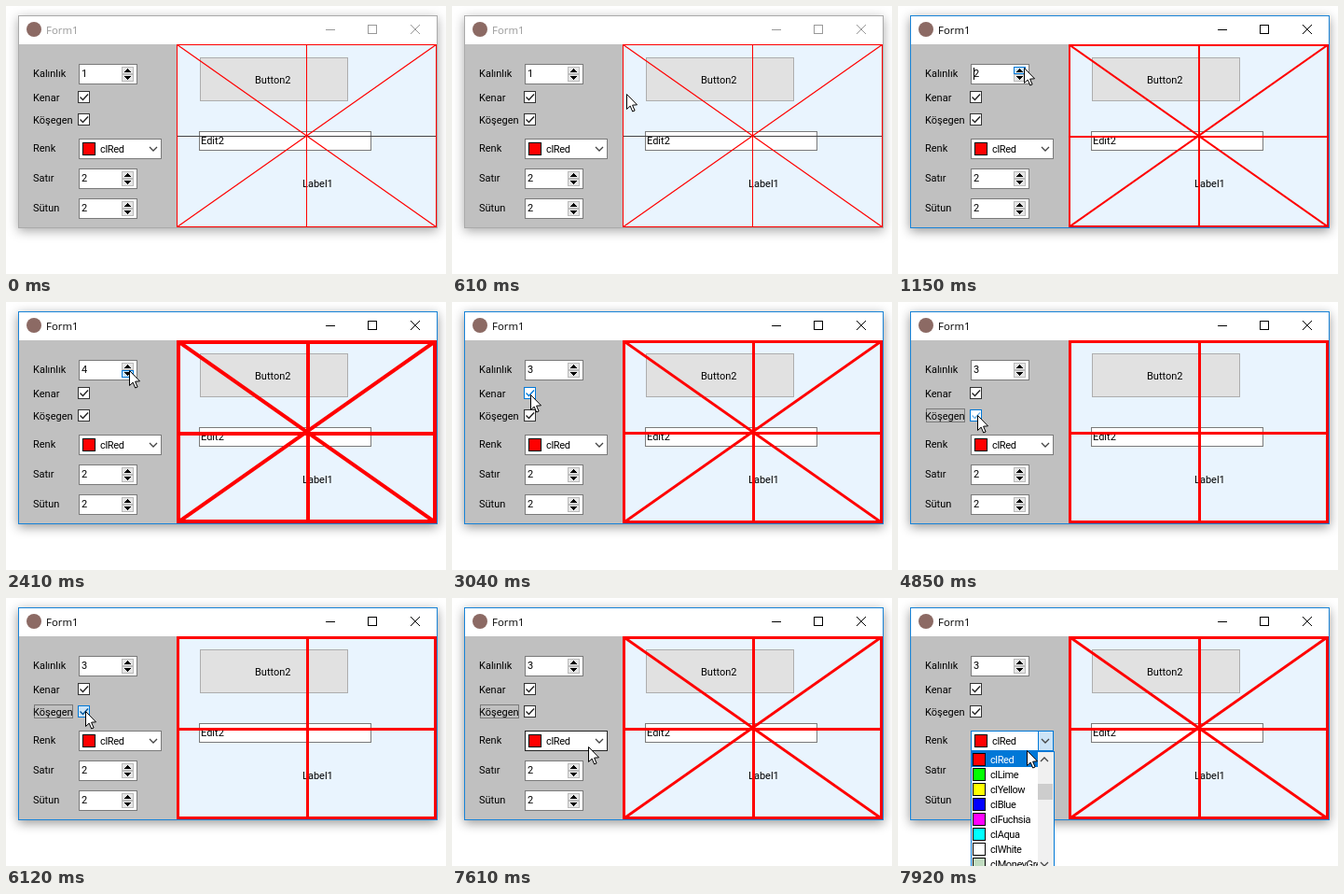
Write an HTML page with a canvas that moves like this. It is 472 px wide and 287 px high and loops after 8000 ms.

```html
<!DOCTYPE html>
<html lang="tr">
<head>
<meta charset="utf-8">
<style>
html, body { margin: 0; width: 100%; height: 100%; overflow: hidden; background: #fff; }
canvas { display: block; }
</style>
</head>
<body>
<canvas id="stage" width="472" height="287"></canvas>
<script>
const c = document.getElementById('stage').getContext('2d');
const LOOP = 8000, RED = '#f00', BLUE = '#0078d7', PALE = '#cce4f7', GRAY = '#7a7a7a';
const UI = '11px Roboto, sans-serif';
const COLORS = [['clRed', RED], ['clLime', '#0f0'], ['clYellow', '#ff0'], ['clBlue', '#00f'],
  ['clFuchsia', '#f0f'], ['clAqua', '#0ff'], ['clWhite', '#fff'], ['clMoneyGreen', '#c0dcc0']];

// Pointer path: time, x, y
const PATH = [[70, 380, 198], [840, 135, 66], [2020, 135, 66], [2180, 132, 73], [2570, 132, 73],
  [3040, 84, 99], [4070, 84, 99], [4690, 85, 121], [7060, 85, 121], [7610, 146, 159],
  [7760, 155, 156], [7840, 150, 158], [7920, 138, 163]];
const EDGE_CLICKS = [3200, 3820];
const DIAGONAL_CLICKS = [4770, 5480, 6120, 6830];

const within = (t, from, to) => t >= from && t < to;
const count = (t, times) => times.filter(x => t >= x).length;

function fill(x, y, w, h, color) {
  c.fillStyle = color;
  c.fillRect(x, y, w, h);
}

function box(x, y, w, h, color, border) {
  fill(x, y, w, h, border);
  fill(x + 1, y + 1, w - 2, h - 2, color);
}

function text(s, x, y, color = '#000', font = UI, spacing = 0) {
  c.font = font;
  c.letterSpacing = spacing + 'px';
  c.fillStyle = color;
  c.fillText(s, x, y);
}

function line(points, color, width = 1) {
  c.beginPath();
  points.forEach(([x, y]) => c.lineTo(x, y));
  c.strokeStyle = color;
  c.lineWidth = width;
  c.stroke();
}

function chevron(x, y, dir) {
  line([[x - 4, y - 2 * dir], [x, y + 2 * dir], [x + 4, y - 2 * dir]], '#444', 1.3);
}

function drawWindow(active) {
  const ink = active ? '#000' : '#999';
  c.save();
  c.shadowColor = active ? 'rgba(0,0,0,.42)' : 'rgba(0,0,0,.34)';
  c.shadowBlur = 11;
  c.shadowOffsetY = 3;
  fill(13, 10, 450, 228, '#fff');
  c.restore();
  box(13, 10, 450, 228, '#fff', active ? '#1883d7' : '#aaa');
  c.fillStyle = '#8c6a64';
  c.beginPath();
  c.arc(30, 25, 8, 0, 7);
  c.fill();
  text('Form1', 43, 30, ink, '11.4px "Open Sans", sans-serif');
  fill(343, 25, 10, 1, ink);
  box(388, 20, 10, 10, '#fff', ink);
  line([[434, 20], [444, 30]], ink);
  line([[444, 20], [434, 30]], ink);
  fill(14, 41, 169, 196, '#c0c0c0');
  fill(183, 41, 279, 196, '#e9f4fe');
}

function spinner(y, value, hot = 0) {
  box(78, y, 63, 22, '#fff', GRAY);
  text(value, 81, y + 14);
  for (const dir of [1, -1]) {
    const top = dir > 0 ? y + 3 : y + 11, tip = dir > 0 ? top + 2 : top + 6;
    const on = hot === dir;
    box(124, top, 13, 8, on ? PALE : '#e6e6e6', on ? BLUE : '#bbb');
    for (let i = 0; i < 4; i++) fill(130 - i, tip + i * dir - (dir < 0 ? 1 : 0), 2 * i + 1, 1, '#000');
  }
}

// The tick fades shortly after every click.
function checkbox(t, y, clicks, hot) {
  const n = count(t, clicks), checked = n % 2 === 0;
  const fade = n ? Math.min(1, Math.max(0, (t - clicks[n - 1] - 20) / 140)) : 1;
  const pressed = n > 0 && t - clicks[n - 1] < 80;
  box(77, y, 13, 13, pressed ? PALE : '#fff', hot ? BLUE : '#333');
  c.globalAlpha = checked ? fade : 1 - fade;
  line([[79.5, y + 6.5], [82.5, y + 9.5], [88, y + 3.5]], pressed ? '#005499' : hot ? BLUE : '#222', 1.4);
  c.globalAlpha = 1;
}

function focusRect(x, y, w, h) {
  c.setLineDash([1, 1]);
  c.strokeStyle = '#333';
  c.lineWidth = 1;
  c.strokeRect(x + .5, y + .5, w - 1, h - 1);
  c.setLineDash([]);
}

function swatch(x, y, color) {
  box(x, y, 14, 14, color, '#000');
}

function combo(hot, open) {
  box(78, 142, 89, 22, '#fff', open ? BLUE : hot ? '#222' : GRAY);
  if (open) box(150, 142, 17, 22, PALE, BLUE);
  swatch(82, 146, RED);
  text('clRed', 101, 157, '#000', UI, -.35);
  chevron(158, 153, 1);
}

function dropdown() {
  box(78, 164, 90, 130, '#fff', BLUE);
  c.save();
  c.beginPath();
  c.rect(79, 165, 71, 122);
  c.clip();
  fill(79, 165, 71, 16, BLUE);
  COLORS.forEach(([name, color], i) => {
    swatch(80, 166 + 16 * i, color);
    text(name, 99, 177 + 16 * i, i ? '#000' : '#fff', UI, -.4);
  });
  c.restore();
  fill(150, 165, 17, 122, '#f0f0f0');
  fill(150, 199, 16, 17, '#cdcdcd');
  chevron(157, 173, -1);
  chevron(157, 285, 1);
}

function drawPanel(w, edge, diagonal) {
  const L = 183, T = 41, R = 462, B = 237;
  box(208, 55, 159, 47, '#e1e1e1', '#adadad');
  text('Button2', 267, 83);
  box(207, 134, 185, 21, '#fff', GRAY);
  text('Edit2', 209, 148);
  text('Label1', 318, 194);
  c.save();
  c.beginPath();
  c.rect(L, T, R - L, B - T);
  c.clip();
  fill(L, 139, R - L, w, w > 1 ? RED : '#444');
  fill(322, T, w, B - T, RED);
  if (diagonal) {
    line([[L, T], [R, B]], RED, Math.max(w, 1.2));
    line([[R, T], [L, B]], RED, Math.max(w, 1.2));
  }
  if (edge) {
    c.strokeStyle = RED;
    c.lineWidth = w;
    c.strokeRect(L + w / 2, T + w / 2, R - L - w, B - T - w);
  }
  c.restore();
}

function pointer(t) {
  if (t < PATH[0][0]) return;
  let i = PATH.findIndex(p => p[0] > t);
  if (i < 0) i = PATH.length;
  const a = PATH[i - 1], b = PATH[i] || a;
  let k = b === a ? 0 : (t - a[0]) / (b[0] - a[0]);
  k = k * k * (3 - 2 * k);
  c.save();
  c.translate(Math.round(a[1] + (b[1] - a[1]) * k) + .5, Math.round(a[2] + (b[2] - a[2]) * k) + .5);
  c.beginPath();
  [[0, 0], [0, 16], [3.7, 12.6], [6.2, 18.5], [8.6, 17.5], [6.1, 11.7], [11, 11.3]]
    .forEach(([x, y]) => c.lineTo(x, y));
  c.closePath();
  c.fillStyle = '#fff';
  c.fill();
  c.strokeStyle = '#000';
  c.lineWidth = 1;
  c.stroke();
  c.restore();
}

function draw(t) {
  const thickness = 1 + count(t, [1000, 1230, 1630]) - count(t, [2490]);
  const edge = count(t, EDGE_CLICKS) % 2 === 0;
  const diagonal = count(t, DIAGONAL_CLICKS) % 2 === 0;
  const open = t >= 7840;

  fill(0, 0, 472, 287, '#fff');
  drawWindow(t >= 920);
  [['Kalınlık', 76], ['Kenar', 102], ['Köşegen', 126], ['Renk', 156], ['Satır', 188], ['Sütun', 220]]
    .forEach(([s, y]) => text(s, 29, y));
  spinner(62, thickness, within(t, 800, 2100) ? 1 : within(t, 2100, 2720) ? -1 : 0);
  if (within(t, 920, 1230)) fill(81, 66, 1, 13, '#000');
  checkbox(t, 91, EDGE_CLICKS, within(t, 2960, 4300));
  checkbox(t, 115, DIAGONAL_CLICKS, within(t, 4500, 7220));
  if (within(t, 3200, 4770)) focusRect(30, 92, 30, 13);
  if (within(t, 4770, 7760)) focusRect(30, 114, 42, 15);
  combo(t >= 7530, open);
  spinner(174, 2);
  spinner(206, 2);
  drawPanel(thickness, edge, diagonal);
  if (open) dropdown();
  pointer(t);
}

const start = performance.now();
function tick() {
  draw((performance.now() - start) % LOOP);
  requestAnimationFrame(tick);
}
tick();
</script>
</body>
</html>
```
